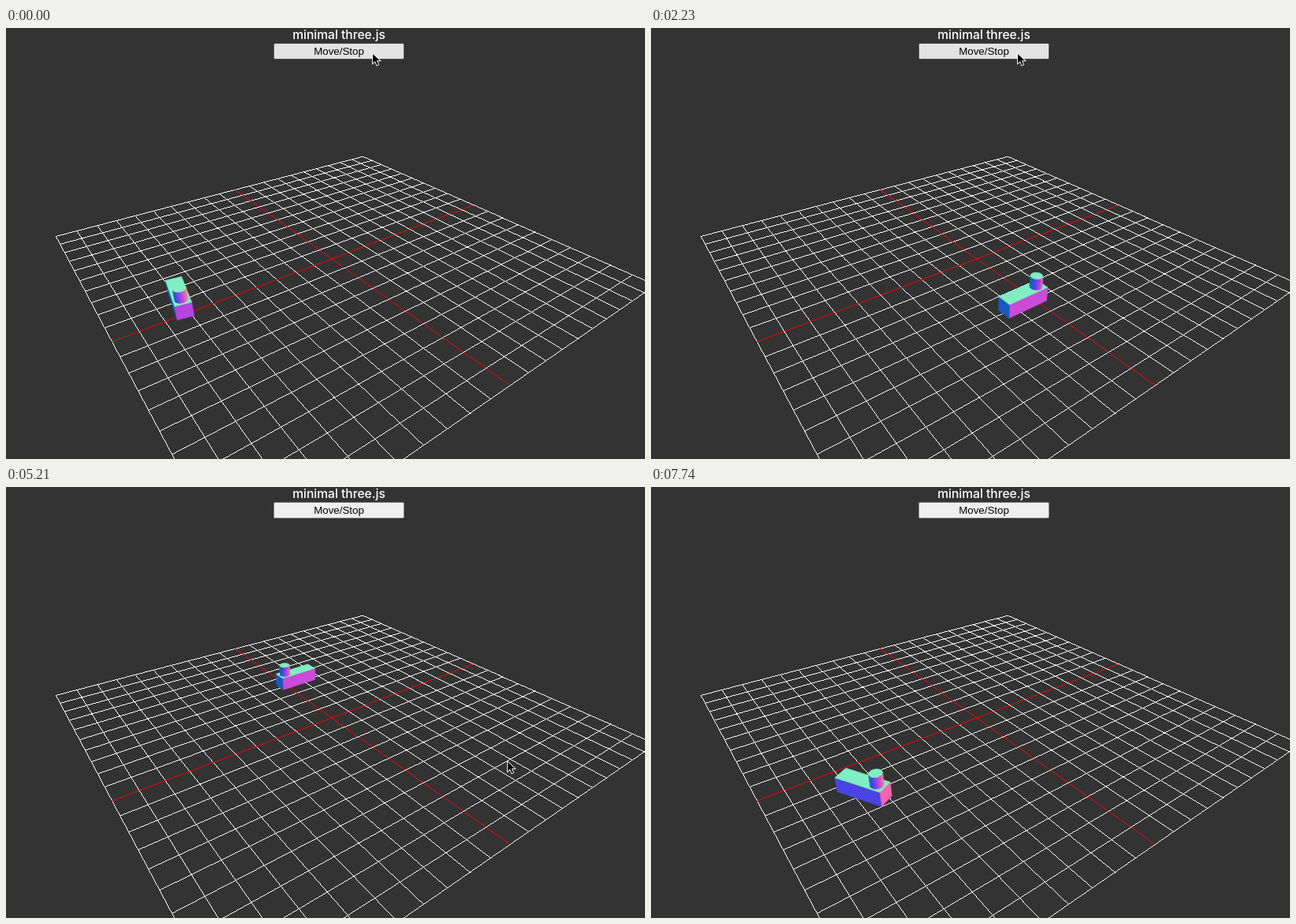
Recreate the animation shown at these times as an HTML page with a canvas. Size 810 px wide and 547 px high, loop 8610 ms.

```html
<!DOCTYPE html>
<html>
<head>
<meta charset="utf-8">
<style>
  html, body { margin: 0; width: 810px; height: 547px; overflow: hidden; background: #333; }
  canvas { position: absolute; left: 0; top: 0; }
  h1 { position: absolute; left: 322px; top: -1px; width: 200px; margin: 0; text-align: center;
       color: #fff; font: 500 15.6px/20px Inter, sans-serif; white-space: nowrap; }
  #button { position: absolute; left: 339px; top: 19px; width: 166px; height: 21px; box-sizing: border-box;
       border: 1px solid #767676; border-radius: 2px; background: #efefef; color: #000;
       text-align: center; font: 13.333px/19px "Liberation Sans", Arial, sans-serif; }
  #button.hover { background: #e3e3e3; border-color: #4f4f4f; }
  #button.active { background: #f5f5f5; }
  #cursor { position: absolute; left: 0; top: 0; overflow: visible; }
</style>
</head>
<body>
<canvas id="floor" width="810" height="547"></canvas>
<canvas id="stage" width="810" height="547"></canvas>
<h1>minimal three.js</h1>
<div id="button">Move/Stop</div>
<svg id="cursor" width="12" height="19">
  <path d="M1 2V13.8L4 11L6.2 16.2L8 15.4L5.8 10.3H9.8Z" stroke="#fff" stroke-width="1.8" paint-order="stroke"/>
</svg>
<script>
const LOOP = 8610, STEP = 148.6, START = 735, STOP = 7105;
const { sin, cos, PI, floor, round, abs, max, min } = Math;
const $ = id => document.getElementById(id);
const ctx = $('stage').getContext('2d');

// Camera looking at the origin; the floor spans -1..1 in u and v, h points up.
const cam = { x: 413.1, y: 292.8, focal: 631, dist: 2.334, yaw: 36.1 * PI / 180, pitch: 31.25 * PI / 180 };
const sy = sin(cam.yaw), cy = cos(cam.yaw), sp = sin(cam.pitch), cp = cos(cam.pitch);

function toView([u, v, h]) {
  const away = sy * u - cy * v;
  return [cy * u + sy * v, h * cp + away * sp, h * sp - away * cp];
}

function project(p) {
  const [x, y, z] = toView(p), k = cam.focal / (cam.dist - z);
  return [cam.x + x * k, cam.y - y * k];
}

const normalColor = n => `rgb(${toView(n).map(c => round(127.5 * (1 + c)))})`;

// Hard-edged one pixel line
function pixelLine(g, a, b, color) {
  const [x0, y0] = project(a), [x1, y1] = project(b);
  const n = Math.ceil(max(abs(x1 - x0), abs(y1 - y0)));
  g.fillStyle = color;
  for (let i = 0; i <= n; i++)
    g.fillRect(floor(x0 + (x1 - x0) * i / n), floor(y0 + (y1 - y0) * i / n), 1, 1);
}

function drawFloor() {
  const g = $('floor').getContext('2d');
  for (let i = -10; i <= 10; i++) {
    const k = i / 10, color = i ? '#fff' : '#f00';
    pixelLine(g, [-1, k, 0], [1, k, 0], color);
    pixelLine(g, [k, -1, 0], [k, 1, 0], color);
  }
}

// Fills a polygon if it faces the camera
function face(points, normal) {
  const p = points.map(project);
  const area = p.reduce((sum, [x, y], i) => {
    const [nx, ny] = p[(i + 1) % p.length];
    return sum + x * ny - nx * y;
  }, 0);
  if (area <= 0) return;
  ctx.fillStyle = ctx.strokeStyle = normalColor(normal);
  ctx.beginPath();
  p.forEach(([x, y]) => ctx.lineTo(x, y));
  ctx.closePath();
  ctx.fill();
  ctx.stroke();
}

function prism(base, bottom, top) {
  base.forEach(([u, v], i) => {
    const [u2, v2] = base[(i + 1) % base.length];
    const len = Math.hypot(u2 - u, v2 - v);
    face([[u, v, bottom], [u2, v2, bottom], [u2, v2, top], [u, v, top]],
         [(v2 - v) / len, (u - u2) / len, 0]);
  });
  face(base.map(([u, v]) => [u, v, top]), [0, 0, 1]);
}

// Stadium track: two half circles joined by straights
const BEND = 0.405, HALF = 0.31, LAP_HALF = PI * BEND + 2 * HALF;

function pose(s) {
  s += BEND * PI / 2;
  const back = floor(s / LAP_HALF) & 1, d = s - floor(s / LAP_HALF) * LAP_HALF;
  const bend = min(d / BEND, PI) - PI / 2;
  const run = max(0, d - PI * BEND);
  const sign = back ? -1 : 1;
  return {
    u: sign * (run - HALF - BEND * cos(bend)),
    v: sign * BEND * sin(bend),
    turn: PI / 2 - bend + back * PI
  };
}

const boxBase = [[.1, .033], [-.1, .033], [-.1, -.033], [.1, -.033]];
const tubeBase = Array.from({ length: 32 }, (_, i) =>
  [.065 + .025 * cos(i * PI / 16), .025 * sin(i * PI / 16)]);

function drawRobot(t) {
  const { u, v, turn } = pose(-0.0745 + 0.000638 * (max(START, min(STOP, t)) - START));
  const c = cos(turn), s = sin(turn);
  const place = base => base.map(([x, y]) => [u + x * c - y * s, v + x * s + y * c]);
  ctx.clearRect(0, 0, 810, 547);
  ctx.lineWidth = 0.5;
  prism(place(boxBase), 0, .066);
  prism(place(tubeBase), .066, .118);
}

// Pointer path: step, x, y
const path = [
  [0, 464, 31], [12, 464, 31], [13, 543, 86], [14, 564, 141], [15, 622, 165], [16, 640, 206],
  [18, 718, 252], [19, 730, 278], [21, 778, 385], [22, 780, 430], [24, 800, 560], [28, 720, 560],
  [30, 645, 400], [31, 635, 347], [33, 590, 235], [36, 494, 30], [45, 494, 30],
  [46, 590, 220], [47, 702, 500], [48, 720, 600]
];

function pointerAt(k) {
  const i = path.findIndex(p => p[0] >= k);
  if (i < 0) return [720, 600];
  if (i == 0) return path[0].slice(1);
  const [k0, x0, y0] = path[i - 1], [k1, x1, y1] = path[i], f = (k - k0) / (k1 - k0);
  return [x0 + (x1 - x0) * f, y0 + (y1 - y0) * f];
}

function draw(now) {
  const t = now % LOOP;
  const k = max(-1, floor((t - 590) / STEP));
  drawRobot(600 + k * STEP);
  const [x, y] = pointerAt(k);
  $('cursor').style.transform = `translate(${x}px, ${y}px)`;
  const hover = x < 505 && y < 40;
  $('button').className = k == 0 || k == 43 ? 'active' : hover ? 'hover' : '';
  requestAnimationFrame(draw);
}

drawFloor();
requestAnimationFrame(draw);
</script>
</body>
</html>
```
